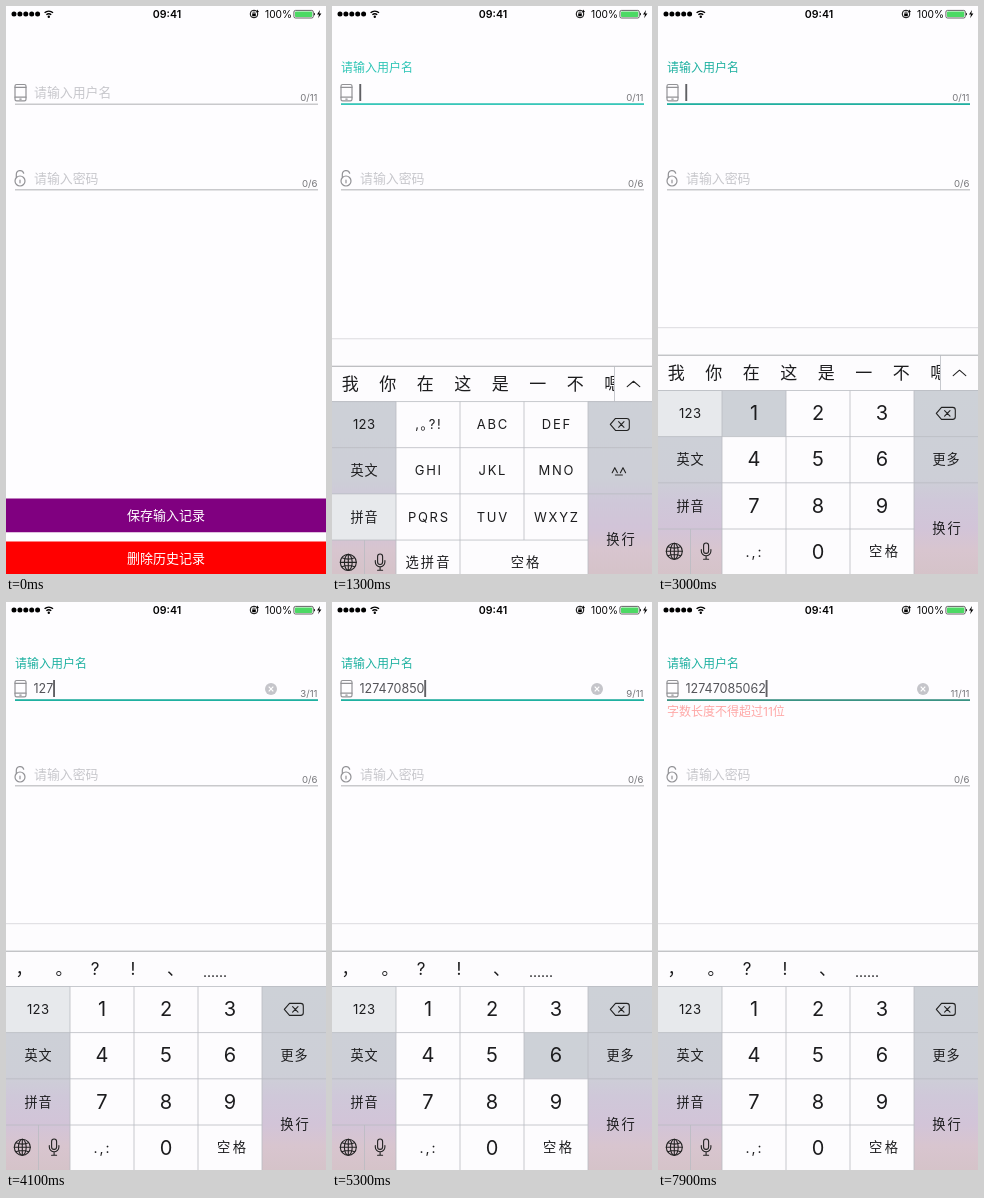
These frames come from a looping animation (320x568 px, 8000 ms). An HTML page:

```html
<!DOCTYPE html>
<html lang="zh-CN">
<head>
<meta charset="utf-8">
<title>输入框</title>
<style>
html, body { margin: 0; width: 100%; height: 100%; overflow: hidden; background: #fefdff; }
svg { display: block; width: 320px; height: 568px; }
text { font-family: Inter, "Noto Sans CJK SC", "Noto Sans CJK", sans-serif; }
.mid { text-anchor: middle; }
.icon { fill: none; stroke: #929296; stroke-width: 1.2; stroke-linecap: round; }
.ink { fill: none; stroke: #222; stroke-width: 1.1; stroke-linecap: round; stroke-linejoin: round; }
.grid { fill: none; stroke: #b9bcc2; stroke-width: .8; }
.count { font-size: 9.6px; fill: #77777b; text-anchor: end; }
#board, #tint { --d: 247px; animation: slide 8s infinite; }
#tint { --d: -247px; }
#label { font-size: 12px; animation: float 8s infinite; }
#line { transform-origin: 9px 98px; animation: grow 8s infinite; }
#error { font-size: 12px; fill: #ff3b36; animation: warn 8s infinite; }
@keyframes slide {
  0%, 13.5% { transform: translateY(var(--d)); animation-timing-function: cubic-bezier(.33, 1, .68, 1); }
  17.75%, 100% { transform: translateY(0); }
}
@keyframes float {
  0%, 13.5% { transform: translate(28px, 91.2px) scale(1.075); fill: #c7c7cc; animation-timing-function: ease-out; }
  16.1% { transform: translate(9px, 66.4px) scale(1); fill: #2ec5b6; }
  24%, 100% { transform: translate(9px, 66.4px) scale(1); fill: #1fb1a1; }
}
@keyframes grow {
  0%, 13.5% { transform: scaleX(0); stroke: #36c8ba; animation-timing-function: ease-out; }
  16.1% { transform: scaleX(1); stroke: #36c8ba; }
  24%, 96.9% { transform: scaleX(1); stroke: #1fb1a1; }
  98.75% { transform: scaleX(1); stroke: #3a9384; }
  100% { transform: scaleX(1); stroke: #5d7d70; }
}
@keyframes warn {
  0%, 96.9% { opacity: 0; }
  100% { opacity: .5; }
}
</style>
</head>
<body>
<svg viewBox="0 0 320 568">
  <defs>
    <linearGradient id="glass" gradientUnits="userSpaceOnUse" x1="0" y1="384" x2="0" y2="568">
      <stop offset="0" stop-color="#cdd1d7"/>
      <stop offset=".48" stop-color="#cdcfd7"/>
      <stop offset=".6" stop-color="#cfc8d9"/>
      <stop offset=".75" stop-color="#d2c4d8"/>
      <stop offset=".87" stop-color="#d8c5cf"/>
      <stop offset="1" stop-color="#d5c3c9"/>
    </linearGradient>
    <clipPath id="sides"><path d="M0 384h64v184h-64zM256 384h64v184h-64z"/></clipPath>
    <clipPath id="strip"><path d="M0 349h282v36h-282z"/></clipPath>
  </defs>

  <g id="status">
    <path d="M8 8h24" stroke="#000" stroke-width="5" stroke-linecap="round" stroke-dasharray="0 5.9"/>
    <path d="M38.6 6.8a6 6 0 0 1 8.4 0M40.4 8.8a3.5 3.5 0 0 1 4.8 0" fill="none" stroke="#000" stroke-width="1.4"/>
    <circle cx="42.8" cy="10.7" r="1.2"/>
    <text class="mid" x="161" y="12" font-size="10.6" font-weight="600">09:41</text>
    <circle cx="248" cy="8" r="3.8" fill="none" stroke="#000"/>
    <path d="M246.2 7.6h3.6v2.6h-3.6zM251.2 3.6l1.8 2.4-2.6.4z"/>
    <path d="M247 7.6v-.8a1 1 0 0 1 2 0v.8" fill="none" stroke="#000" stroke-width=".7"/>
    <text x="259" y="11.8" font-size="10.2">100%</text>
    <rect x="287.9" y="4.4" width="19.4" height="7.6" rx="1.6" fill="#fff" stroke="#222" stroke-width=".7"/>
    <rect x="289" y="5.5" width="17.2" height="5.4" rx=".7" fill="#4cd964"/>
    <path d="M308 6.8a1.5 1.5 0 0 1 0 2.8z"/>
    <path d="M314 4l-3 4.6h2l-.9 3.6 3.3-4.8h-2.1z"/>
  </g>

  <g id="fields">
    <path d="M9 98.2h303M9 183.7h303" stroke="#c9c9cc" stroke-width="1.4"/>
    <path id="line" d="M9 98.2h303" stroke-width="1.8"/>
    <g class="icon">
      <rect x="9" y="78.5" width="11" height="16.3" rx="1.6"/>
      <path d="M9 81.3h11M9 91.2h11M13.8 93.1h1.4"/>
      <circle cx="14" cy="175" r="5"/>
      <path d="M10.3 171.2v-2.8a3.8 3.8 0 0 1 7.4-1.2M14 174.2v2.6"/>
    </g>
    <text id="label">请输入用户名</text>
    <text x="28" y="176.7" font-size="12.9" fill="#c7c7cc">请输入密码</text>
    <text id="typed" x="27.5" y="91.4" font-size="12.5" fill="#55555a"></text>
    <rect id="caret" y="78" width="1.9" height="17" fill="#606064"/>
    <g id="clear">
      <circle cx="265" cy="87" r="6" fill="#c5c5ca"/>
      <path d="M262.7 84.7l4.6 4.6m0-4.6l-4.6 4.6" stroke="#fff" stroke-width="1.2"/>
    </g>
    <text id="count" class="count" x="311.5" y="95.2"></text>
    <text class="count" x="311.5" y="180.8">0/6</text>
    <text id="error" x="9" y="113.5">字数长度不得超过11位</text>
  </g>

  <g class="mid" font-size="13" fill="#fff">
    <path d="M0 492.5h320v33.7h-320z" fill="#800080"/>
    <path d="M0 535.5h320v32.5h-320z" fill="#f00"/>
    <text x="160" y="514.2">保存输入记录</text>
    <text x="160" y="557">删除历史记录</text>
  </g>

  <g id="board">
    <path d="M0 321.5h320v247h-320z" fill="#fdfcfe"/>
    <g clip-path="url(#sides)"><rect id="tint" y="384" width="320" height="184" fill="url(#glass)"/></g>
    <rect id="mode" width="64" height="46" fill="#e7e9ec"/>
    <rect id="press" width="64" height="46" fill="#cdd1d7"/>
    <path d="M0 321.7h320" stroke="#d8d8dc" stroke-width=".9"/>
    <path d="M0 349.2h320" stroke="#a9abaf"/>
    <path class="grid" d="M0 384.5h320M0 430.6h320M0 476.8h256M0 523h256M256 476.8h64M64 384.5v184M128 384.5v184M192 384.5v138.5M256 384.5v184M32.5 523v45"/>
    <g id="words">
      <g id="chars" clip-path="url(#strip)"></g>
      <path class="grid" d="M282.5 349v35.5"/>
      <path class="ink" d="M295.2 369.6l6.3-5.4 6.3 5.4"/>
    </g>
    <g id="marks"></g>
    <g id="common">
      <g class="ink">
        <path d="M278.3 407.4l5.2-6h11.2a2.6 2.6 0 0 1 2.6 2.6v6.8a2.6 2.6 0 0 1-2.6 2.6h-11.2zM286.6 404.6l5.4 5.6m0-5.6l-5.4 5.6"/>
        <circle cx="16.3" cy="545.3" r="8"/>
        <ellipse cx="16.3" cy="545.3" rx="3.9" ry="8"/>
        <path d="M16.3 537.3v16M8.3 545.3h16M10 540.8q6.3 2.6 12.6 0M10 549.8q6.3-2.6 12.6 0"/>
        <rect x="45.6" y="537" width="5" height="10.4" rx="2.5"/>
        <path d="M43.3 543.5v1.5a4.8 4.8 0 0 0 9.6 0v-1.5M48.1 549.8v3.3M45.6 553.2h5"/>
      </g>
    </g>
    <g id="pinyin">
      <path class="ink" d="M280.2 455.6l2.6-5 2.6 5M288.4 455.6l2.6-5 2.6 5M283.4 458h7"/>
    </g>
    <g id="digits">
      <path class="grid" d="M192 523v45"/>
    </g>
  </g>
</svg>
<script>
const $ = id => document.getElementById(id);
const LOOP = 8000, HOLD = 120, FOCUS = 1150, SWITCH = 2480, LIMIT = 11;
const row = i => 384.5 + 46.2 * i;

function put(group, str, x, y, size, gap = 0) {
  const el = document.createElementNS('http://www.w3.org/2000/svg', 'text');
  el.textContent = str;
  el.setAttribute('class', 'mid');
  el.setAttribute('x', x + gap / 2);
  el.setAttribute('y', y + size * .36);
  el.setAttribute('font-size', size);
  el.setAttribute('fill', '#1c1c1e');
  if (gap) el.setAttribute('letter-spacing', gap);
  $(group).append(el);
}

// Key faces
['123', '英文', '拼音'].forEach((s, i) => put('common', s, 32, row(i) + 23, 13.1, i ? .9 : .3));
put('common', '换行', 288.5, 522.5, 13.3, 2);
[',｡?!', 'ABC', 'DEF', 'GHI', 'JKL', 'MNO', 'PQRS', 'TUV', 'WXYZ'].forEach((s, i) =>
  put('pinyin', s, 96 + i % 3 * 64, row(i / 3 | 0) + 23, 13, 1.7));
put('pinyin', '选拼音', 95.5, 545.5, 13.3, 2);
put('pinyin', '空格', 193, 545.5, 13.3, 2);

const spot = d => d ? [64 + (d - 1) % 3 * 64, row((d - 1) / 3 | 0)] : [128, row(3)];
for (let d = 0; d < 10; d++) {
  const [x, y] = spot(d);
  put('digits', d, x + 32, y + 22.5, 20);
}
put('digits', '.,:', 95.5, 545.5, 14, 2);
put('digits', '更多', 288, 453.5, 13.1, .9);
put('digits', '空格', 225.5, 545.5, 13.3, 2.4);

// Suggestion strip
[...'我你在这是一不嗯'].forEach((c, i) => put('chars', c, 18.3 + 37.5 * i, 367, 17));
[...'，。?!、'].forEach((c, i) => put('marks', c, [18, 58, 89, 127, 169.5][i], 367, 17));
put('marks', '......', 209, 369.5, 14);

// Digit and the moment its key goes down; the last one exceeds the limit
const taps = [[1, 2920], [2, 3400], [7, 3800], [4, 4130], [7, 4330], [0, 4530],
  [8, 4730], [5, 4930], [0, 5130], [6, 5280], [2, 6020], [5, 7600]];

const show = (id, on) => { $(id).style.display = on ? '' : 'none'; };
const clamp = v => Math.max(0, Math.min(1, v));

function blink(t) {
  if (t < FOCUS) return 0;
  if (t > 2900 && t < 5500) return 1;
  const p = t % 1000;
  return clamp(Math.max((500 - p) / 100, (p - 750) / 100));
}

function draw(t) {
  const text = taps.filter(k => t >= k[1] + HOLD).map(k => k[0]).join('').slice(0, LIMIT);
  if ($('typed').textContent !== text) $('typed').textContent = text;
  $('count').textContent = text.length + '/' + LIMIT;
  $('caret').setAttribute('x', 27.3 + (text ? $('typed').getComputedTextLength() : 0));
  $('caret').setAttribute('opacity', blink(t));
  show('clear', text);
  show('words', !text);
  show('marks', text);

  const numeric = t >= SWITCH;
  show('digits', numeric);
  show('pinyin', !numeric);
  $('mode').setAttribute('y', row(numeric ? 0 : 2));

  const down = taps.find(k => t >= k[1] && t < k[1] + HOLD);
  show('press', down);
  if (down) {
    const [x, y] = spot(down[0]);
    $('press').setAttribute('x', x);
    $('press').setAttribute('y', y);
  }
}

const start = performance.now();
function tick() {
  draw((performance.now() - start) % LOOP);
  requestAnimationFrame(tick);
}
tick();
</script>
</body>
</html>
```
